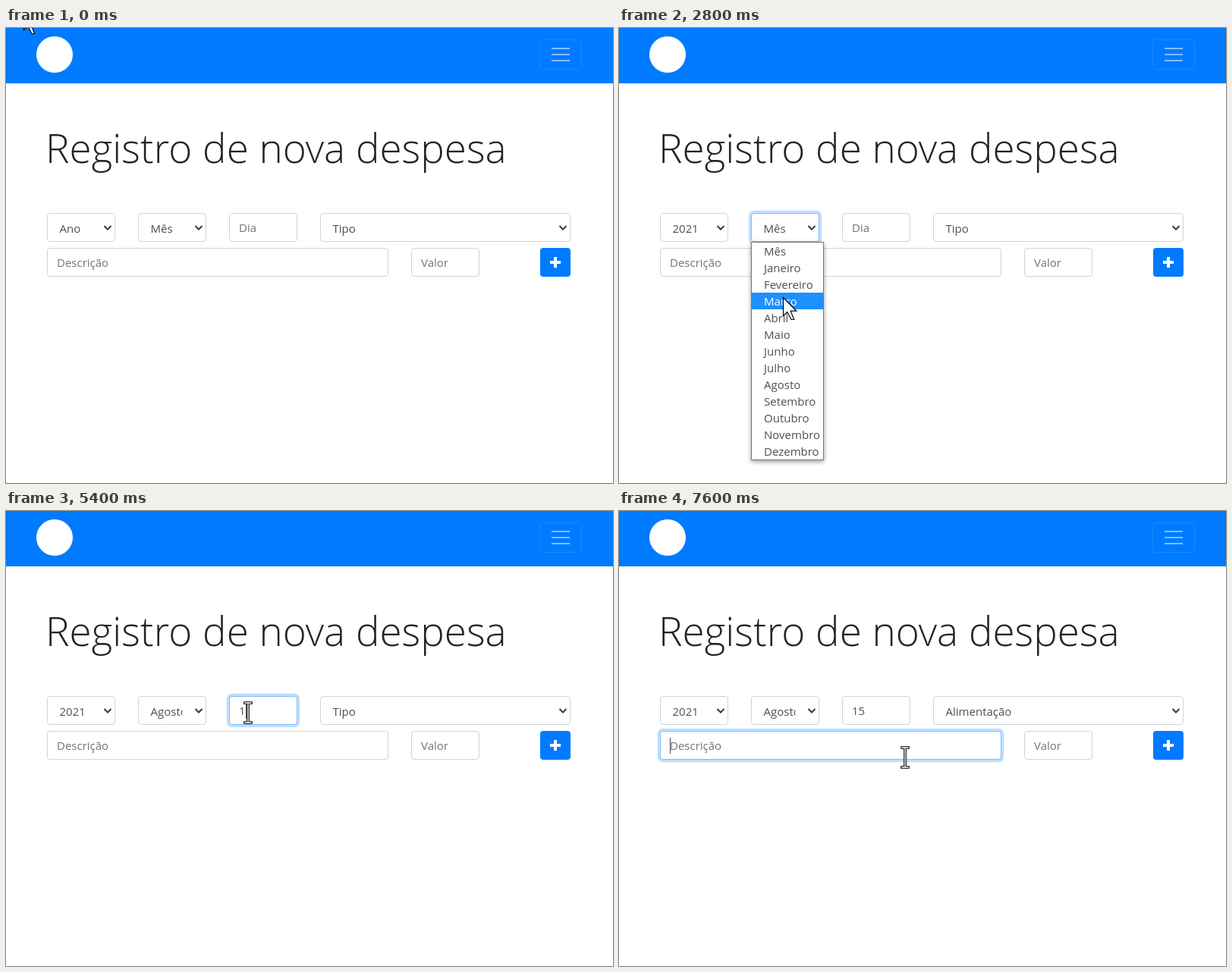
Animation, 800 px wide and 600 px high, one loop 8000 ms. Source, as an HTML page with a canvas:

```html
<!DOCTYPE html>
<html lang="pt-BR">
<head>
<meta charset="utf-8">
<title>Registro de nova despesa</title>
<style>
html, body { margin: 0; width: 100%; height: 100%; overflow: hidden; background: #fff; }
canvas { display: block; width: 800px; height: 600px; }
</style>
</head>
<body>
<canvas id="stage" width="800" height="600"></canvas>
<script>
const ctx = document.getElementById('stage').getContext('2d');
const LOOP = 8000, STEP = 100, ROW = 22;
const FACE = '"Open Sans", "Noto Sans", sans-serif';
const INK = '#495057', HINT = '#6c757d', BLUE = '#007bff';

const boxes = {
  year: [54, 244, 90], month: [174, 244, 90], day: [294, 244, 90],
  type: [414, 244, 330], note: [54, 290, 450], value: [534, 290, 90]
};

const menus = [
  { box: 'year', from: 800, to: 1800, w: 90,
    items: ['Ano', ...Array.from({ length: 9 }, (_, i) => String(2018 + i))] },
  { box: 'month', from: 2400, to: 3900, w: 96,
    items: ['Mês', 'Janeiro', 'Fevereiro', 'Março', 'Abril', 'Maio', 'Junho', 'Julho',
      'Agosto', 'Setembro', 'Outubro', 'Novembro', 'Dezembro'] },
  { box: 'type', from: 6300, to: 7000, w: 330,
    items: ['Tipo', 'Alimentação', 'Educação', 'Lazer', 'Saúde', 'Transporte', 'Outros'] }
];

// Times at which each field takes the focus
const focusLog = [[780, 'year'], [2380, 'month'], [4550, 'day'], [6280, 'type'], [7450, 'note']];

// Pointer path: time, x, y, eased segment
const path = [
  [0, 23, -22], [100, 23, -22], [500, 71, 262, 1],
  [800, 71, 262], [1200, 82, 354], [1500, 84, 376],
  [1800, 84, 376], [2200, 216, 264, 1],
  [2400, 216, 264], [2800, 216, 355], [3200, 221, 439], [3300, 221, 456],
  [3400, 221, 456], [3500, 221, 465], [3600, 221, 474],
  [3900, 221, 474], [4600, 319, 266, 1],
  [5700, 319, 266], [6100, 434, 261, 1],
  [6300, 434, 261], [6600, 445, 312],
  [7000, 445, 312], [7500, 377, 325, 1], [LOOP, 377, 325]
];

const clamp = (v, a, b) => Math.min(b, Math.max(a, v));

function pointer(t) {
  const i = Math.max(1, path.findIndex(k => k[0] >= t));
  const a = path[i - 1], b = path[i];
  let p = clamp((t - a[0]) / (b[0] - a[0]), 0, 1);
  if (b[3]) p = p * p * (3 - 2 * p);
  return { x: Math.round(a[1] + (b[1] - a[1]) * p), y: Math.round(a[2] + (b[2] - a[2]) * p) };
}

function text(s, x, y, color = INK, font = '15px ') {
  ctx.font = font + FACE;
  ctx.fillStyle = color;
  ctx.fillText(s, x, y);
}

function rounded(x, y, w, h, r) {
  ctx.beginPath();
  ctx.roundRect(x, y, w, h, r);
}

function lines(color, width, ...runs) {
  ctx.strokeStyle = color;
  ctx.lineWidth = width;
  ctx.beginPath();
  for (const run of runs) {
    run.forEach(([x, y], i) => i ? ctx.lineTo(x, y) : ctx.moveTo(x, y));
  }
  ctx.stroke();
}

// Focus strength from 0 to 1, with a 150 ms fade between fields
function focusOf(name, t) {
  const i = focusLog.findLastIndex(f => f[0] <= t);
  if (i < 0) return 0;
  const p = clamp((t - focusLog[i][0]) / 150, 0, 1);
  if (focusLog[i][1] === name) return p;
  return i > 0 && focusLog[i - 1][1] === name ? 1 - p : 0;
}

function field(name, t) {
  const [x, y, w] = boxes[name], f = focusOf(name, t);
  if (f > 0) {
    rounded(x - 3.2, y - 3.2, w + 6.4, 44.4, 7);
    ctx.fillStyle = `rgba(0,123,255,${0.25 * f})`;
    ctx.fill();
  }
  rounded(x + 0.5, y + 0.5, w - 1, 37, 3.5);
  ctx.fillStyle = '#fff';
  ctx.fill();
  ctx.lineWidth = 1;
  ctx.strokeStyle = `rgb(${206 - 78 * f},${212 - 23 * f},${218 + 37 * f})`;
  ctx.stroke();
}

function select(name, label, t) {
  const [x, y, w] = boxes[name];
  field(name, t);
  ctx.save();
  ctx.beginPath();
  ctx.rect(x + 12, y, w - 43.5, 38);
  ctx.clip();
  text(label, x + 16.5, y + 26);
  ctx.restore();
  const cx = x + w - 10;
  lines('#343a40', 2, [[cx - 4.5, y + 17], [cx, y + 21.5], [cx + 4.5, y + 17]]);
}

function input(name, hint, value, t) {
  const [x, y] = boxes[name];
  field(name, t);
  text(value || hint, x + 13, y + 25, value ? INK : HINT);
}

function caret(x, y, since, t) {
  if (t < since || (t - since) % 1000 >= 500) return;
  ctx.fillStyle = INK;
  ctx.fillRect(Math.round(x), y + 9, 1, 21);
}

function menu({ box, w, items }, mouse) {
  const x = boxes[box][0], y = 282, h = items.length * ROW + 2;
  const active = clamp(Math.floor((mouse.y - y - 1) / ROW), 0, items.length - 1);
  ctx.save();
  ctx.shadowColor = 'rgba(0,0,0,.4)';
  ctx.shadowBlur = 6;
  ctx.shadowOffsetY = 2;
  ctx.fillStyle = '#767676';
  ctx.fillRect(x, y, w, h);
  ctx.restore();
  ctx.fillStyle = '#fff';
  ctx.fillRect(x + 1, y + 1, w - 2, h - 2);
  items.forEach((s, i) => {
    const top = y + 1 + i * ROW;
    if (i === active) {
      ctx.fillStyle = '#1e90ff';
      ctx.fillRect(x + 1, top, w - 2, ROW);
    }
    text(s, x + 17, top + 17, i === active ? '#fff' : INK);
  });
}

function arrow({ x, y }) {
  ctx.save();
  ctx.translate(x + 0.5, y + 0.5);
  ctx.fillStyle = '#fff';
  ctx.strokeStyle = '#000';
  ctx.lineWidth = 1.2;
  ctx.fill(new Path2D(ARROW));
  ctx.stroke(new Path2D(ARROW));
  ctx.restore();
}
const ARROW = 'M0 0V24L5.3 19L10.5 29H14.2L9.6 17.6H17.2Z';

function beam({ x, y }) {
  const shape = [
    [[x - 4, y - 13], [x + 4, y - 13]],
    [[x, y - 13], [x, y + 13]],
    [[x - 4, y + 13], [x + 4, y + 13]]
  ];
  ctx.lineCap = 'square';
  lines('#000', 3.6, ...shape);
  lines('#fff', 1.4, ...shape);
  ctx.lineCap = 'butt';
}

function inside(name, { x, y }) {
  const [bx, by, w] = boxes[name];
  return x >= bx && x < bx + w && y >= by && y < by + 38;
}

function header() {
  ctx.fillStyle = BLUE;
  ctx.fillRect(0, 0, 800, 73);
  ctx.fillStyle = '#fff';
  ctx.beginPath();
  ctx.arc(64, 35, 24, 0, 7);
  ctx.fill();
  rounded(703.5, 15.5, 55, 39, 4);
  ctx.strokeStyle = 'rgba(255,255,255,.1)';
  ctx.lineWidth = 1;
  ctx.stroke();
  lines('rgba(255,255,255,.5)', 2, ...[27, 35, 43].map(y => [[719, y], [743, y]]));
}

function addButton() {
  rounded(704, 290, 40, 38, 4);
  ctx.fillStyle = BLUE;
  ctx.fill();
  lines('#fff', 4, [[717, 309], [731, 309]], [[724, 302], [724, 316]]);
}

function draw(t) {
  ctx.fillStyle = '#fff';
  ctx.fillRect(0, 0, 800, 600);
  header();
  text('Registro de nova despesa', 52, 178, '#212529', '300 53px ');

  const day = t < 5400 ? '' : t < 5800 ? '1' : '15';
  select('year', t < 1800 ? 'Ano' : '2021', t);
  select('month', t < 3900 ? 'Mês' : 'Agosto', t);
  input('day', 'Dia', day, t);
  select('type', t < 7000 ? 'Tipo' : 'Alimentação', t);
  input('note', 'Descrição', '', t);
  input('value', 'Valor', '', t);
  addButton();

  if (t < 6280) {
    const since = t < 5400 ? 4550 : t < 5800 ? 5400 : 5800;
    ctx.font = '15px ' + FACE;
    caret(307 + ctx.measureText(day).width, 244, since, t);
  }
  caret(67, 290, 7450, t);

  const mouse = pointer(t);
  const open = menus.find(m => t >= m.from && t < m.to);
  if (open) menu(open, mouse);
  const typing = !open && ['day', 'note', 'value'].some(n => inside(n, mouse));
  (typing ? beam : arrow)(mouse);
}

const start = performance.now();
function tick() {
  const t = (performance.now() - start + 1) % LOOP;
  draw(Math.floor(t / STEP) * STEP);
  requestAnimationFrame(tick);
}
tick();
</script>
</body>
</html>
```
